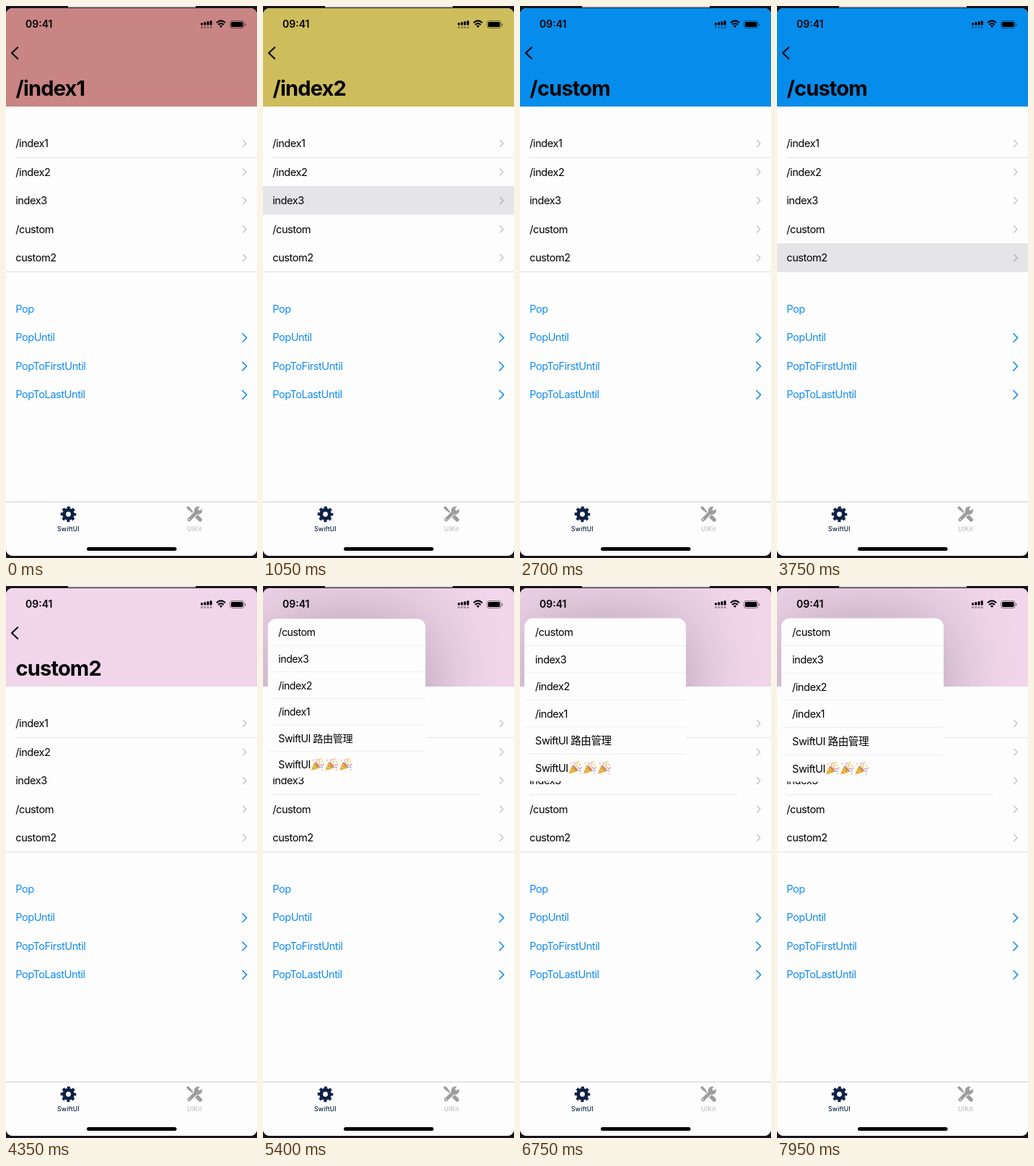
An HTML page that plays this animation: 348x763 px, repeating every 8000 ms.

```html
<!DOCTYPE html>
<html lang="en">
<head>
<meta charset="utf-8">
<title>Route stack</title>
<style>
  html, body { margin: 0; width: 100%; height: 100%; overflow: hidden; background: #17141d; }
  svg { display: block; width: 348px; height: 763px; }
  text { font-family: Inter, "Noto Sans CJK SC", "Noto Sans CJK", sans-serif; font-size: 14.6px; letter-spacing: -.48px; white-space: pre; }
  .title { font-size: 29px; font-weight: 700; letter-spacing: -.85px; }
  .clock { font-size: 14px; font-weight: 600; letter-spacing: 0; }
  .tab { font-size: 8.6px; font-weight: 500; letter-spacing: .2px; text-anchor: middle; }
  .line { fill: none; stroke-linecap: round; stroke-linejoin: round; }
</style>
</head>
<body>
<svg id="stage" viewBox="0 0 348 763"></svg>
<script>
const WIDTH = 348, LOOP = 8000, STEP = 150;
const BLUE = '#128cf0';
const routes = ['/index1', '/index2', 'index3', '/custom', 'custom2'];
const colors = ['#c88584', '#cdbd5c', '#9ffffe', '#068ceb', '#f0d5eb'];
const actions = ['Pop', 'PopUntil', 'PopToFirstUntil', 'PopToLastUntil'];
const tapTimes = [150, 1050, 2100, 3750];
const PRESS = 4650, MENU = 4900, GROW = 6000;
const MENU_ROW = 37.7;

const rect = (x, y, w, h, fill, extra = '') =>
  `<rect x="${x}" y="${y}" width="${w}" height="${h}" fill="${fill}" ${extra}/>`;
const text = (x, y, label, extra = '') => `<text x="${x}" y="${y}" ${extra}>${label}</text>`;
const stroke = (d, color, width, extra = '') =>
  `<path class="line" d="${d}" stroke="${color}" stroke-width="${width}" ${extra}/>`;
const rowY = i => 190 + i * 39.5;
const actionY = i => 419 + i * 39.4;

function chevron(tip, y, size, color, width) {
  return stroke(`M${tip - size} ${y - size}l${size} ${size}l${-size} ${size}`, color, width);
}

function page(title, i) {
  const picked = i + 1;
  let out = rect(0, 0, WIDTH, 763, '#fdfdfd') + rect(0, 0, WIDTH, 139, colors[i]);
  out += text(13.6, 124, title, 'class="title"');
  out += rect(13, 209, 335, 1, '#e3e3e5') + rect(0, 367, WIDTH, 1, '#e0e0e2');
  if (picked < routes.length)
    out += `<g class="pick">${rect(0, rowY(picked) - 20, WIDTH, 39.5, '#e5e4e9')}</g>`;
  routes.forEach((label, r) => {
    out += text(13.3, rowY(r) + 5, label) + chevron(333, rowY(r), 4.4, 'rgba(0,0,0,.23)', 1.4);
  });
  actions.forEach((label, r) => {
    out += text(13.2, actionY(r) + 5, label, `fill="${BLUE}"`);
    if (r) out += chevron(333.7, actionY(r) + .2, 5.9, BLUE, 1.5);
  });
  return `<g class="page">${out}${rect(0, 0, WIDTH, 763, '#000', 'class="dim" opacity="0"')}</g>`;
}

function popper(x, y) {
  return `<g transform="translate(${x} ${y})">
    <path d="M1 18L6 5.5Q12.5 8.5 14 14Z" fill="#f3c04a"/>
    <path d="M3 13.5l3.5 2.5M4.5 9.5l6 5" stroke="#dc9440" stroke-width="1.3"/>
    <ellipse cx="10" cy="9.8" rx="1.3" ry="5" transform="rotate(-42 10 9.8)" fill="#b98250"/>
    ${stroke('M8.5 8Q11 5 8.5 2', '#d9a0dc', 1.2)}
    ${stroke('M11 8Q14 7 13 4T16 1', '#f0c65a', 1.3)}
    ${stroke('M12 11Q14 8 16 10T19 8', '#ef8799', 1.2)}
    ${stroke('M13 13Q16 12 18 14', '#86b9e6', 1.2)}
    <g fill="#f2bd3c"><circle cx="4" cy="3" r="1"/><circle cx="17" cy="5" r="1"/></g>
    <g fill="#ef8799"><circle cx="11" cy="2" r=".8"/><circle cx="17" cy="17" r=".8"/></g>
  </g>`;
}

function menu() {
  const labels = ['/custom', 'index3', '/index2', '/index1', 'SwiftUI 路由管理', 'SwiftUI'];
  let out = rect(0, 0, 225, MENU_ROW * 6, '#fdfdfd', 'rx="12"');
  labels.forEach((label, i) => {
    if (i) out += rect(0, i * MENU_ROW, 225, .8, '#eeebee');
    out += text(15, i * MENU_ROW + 25, label);
  });
  for (let i = 0; i < 3; i++) out += popper(60.5 + i * 20.2, MENU_ROW * 5 + 10);
  return `<g id="menu">${out}</g>`;
}

function statusBar() {
  let out = text(27, 30, '09:41', 'class="clock"');
  for (let i = 0; i < 4; i++) {
    const x = 270 + i * 4.2, h = 3.2 + i;
    out += rect(x, 26.5 - h, 3, h, '#000', 'rx=".8"') + rect(x, 28, 3, 3, '#000', 'rx=".8" opacity=".3"');
  }
  out += stroke('M292 23.2Q298 17.6 304 23.2', '#000', 2.2, 'style="stroke-linecap:butt"');
  out += stroke('M294.2 26Q298 22.4 301.8 26', '#000', 2.1, 'style="stroke-linecap:butt"');
  out += '<path d="M295.8 27.6Q298 25.8 300.2 27.6L298 30Z"/>';
  out += rect(310.5, 20.5, 19.5, 10, 'none', 'rx="3" stroke="#000" stroke-opacity=".45"');
  out += rect(312, 22, 16.5, 7, '#000', 'rx="1.6"') + rect(331, 24, 1.4, 3.4, '#000', 'rx=".7" opacity=".45"');
  return out;
}

function tabBar() {
  const gear = `<g fill="none" stroke="#0e2145" transform="translate(86.5 702.5)">
    <circle r="5.9" stroke-width="5"/>
    <circle r="9" stroke-width="3.6" stroke-dasharray="3.9 3.169" stroke-dashoffset="1.95"/></g>`;
  const gray = '#9d9d9f';
  const tools = stroke('M252.5 693.5L263 704', gray, 2.4) + stroke('M252.3 693.3l2.6 2.6', gray, 3.6)
    + stroke('M264.6 705.6L269.2 710.2', gray, 5.4)
    + stroke('M253.8 710L266 697.8', '#fdfdfd', 7) + stroke('M253.8 710L266 697.8', gray, 4.8)
    + `<circle cx="266.4" cy="697.4" r="5.6" fill="${gray}"/>`
    + stroke('M268.4 695.4L272.5 691.3', '#fdfdfd', 3.8)
    + '<circle cx="254" cy="709.8" r=".9" fill="#fdfdfd"/>';
  return rect(0, 685, WIDTH, 78, '#fdfdfd') + rect(0, 685, WIDTH, 1, '#d0d0d2') + gear + tools
    + text(86.5, 725.5, 'SwiftUI', 'class="tab" fill="#0e2145"')
    + text(261.5, 725.5, 'UIKit', 'class="tab" fill="#bfbfc2"')
    + rect(112, 748, 124.5, 5, '#000', 'rx="2.5"');
}

const stage = document.getElementById('stage');
stage.innerHTML = `
  <defs>
    <clipPath id="screen">${rect(0, 3, WIDTH, 757, '#000', 'rx="9"')}</clipPath>
    <clipPath id="header">${rect(0, 3, WIDTH, 136, '#000')}</clipPath>
    <filter id="soft" x="-80%" y="-80%" width="260%" height="260%"><feGaussianBlur stdDeviation="50"/></filter>
  </defs>
  ${rect(86, 0, 177, 2, '#cfced2')}
  <g clip-path="url(#screen)">
    ${routes.map(page).join('')}
    ${stroke('M16.2 57.2L8 65L16.2 72.8', '#000', 2.1, 'id="back"')}
    ${tabBar()}
    <g id="shade">
      <g clip-path="url(#header)">${rect(6, 44, 225, 226, '#000', 'opacity=".25" filter="url(#soft)"')}</g>
      ${rect(13, 288, 288, 1, '#e8e6e8')}
    </g>
    ${menu()}
    ${statusBar()}
  </g>`;

const find = id => document.getElementById(id);
const pages = [...stage.querySelectorAll('.page')];
const back = find('back'), shade = find('shade'), menuBox = find('menu');

// Critically damped spring, settled once it is nearly there.
function spring(ms) {
  if (ms <= 0) return 0;
  const k = ms * .013, p = 1 - (1 + k) * Math.exp(-k);
  return p > .98 ? 1 : p;
}

function draw(time) {
  const t = Math.floor((time % LOOP) / STEP) * STEP;
  const push = tapTimes.map(tap => spring(t - tap - 120));

  pages.forEach((el, i) => {
    const shown = i ? push[i - 1] : 1, left = push[i] || 0;
    el.style.display = shown > 0 && left < 1 ? '' : 'none';
    el.setAttribute('transform', `translate(${WIDTH * (1 - shown) - 104 * left} 0)`);
    el.querySelector('.dim').setAttribute('opacity', .1 * left);
    const pick = el.querySelector('.pick');
    if (pick) pick.style.display = t >= tapTimes[i] ? '' : 'none';
  });

  const open = spring(t - MENU);
  const grow = Math.min(1, Math.max(0, (t - GROW) / 900));
  const scale = open * (.971 + .029 * grow);
  back.setAttribute('opacity', t >= PRESS && t < MENU ? .25 : 1);
  shade.setAttribute('opacity', open);
  menuBox.style.display = open ? '' : 'none';
  menuBox.setAttribute('transform',
    `translate(${6 + 25 * (1 - scale)} ${44.4 + 25 * (1 - scale)}) scale(${scale})`);
}

const start = performance.now();
function tick() {
  draw(performance.now() - start);
  requestAnimationFrame(tick);
}
tick();
</script>
</body>
</html>
```
